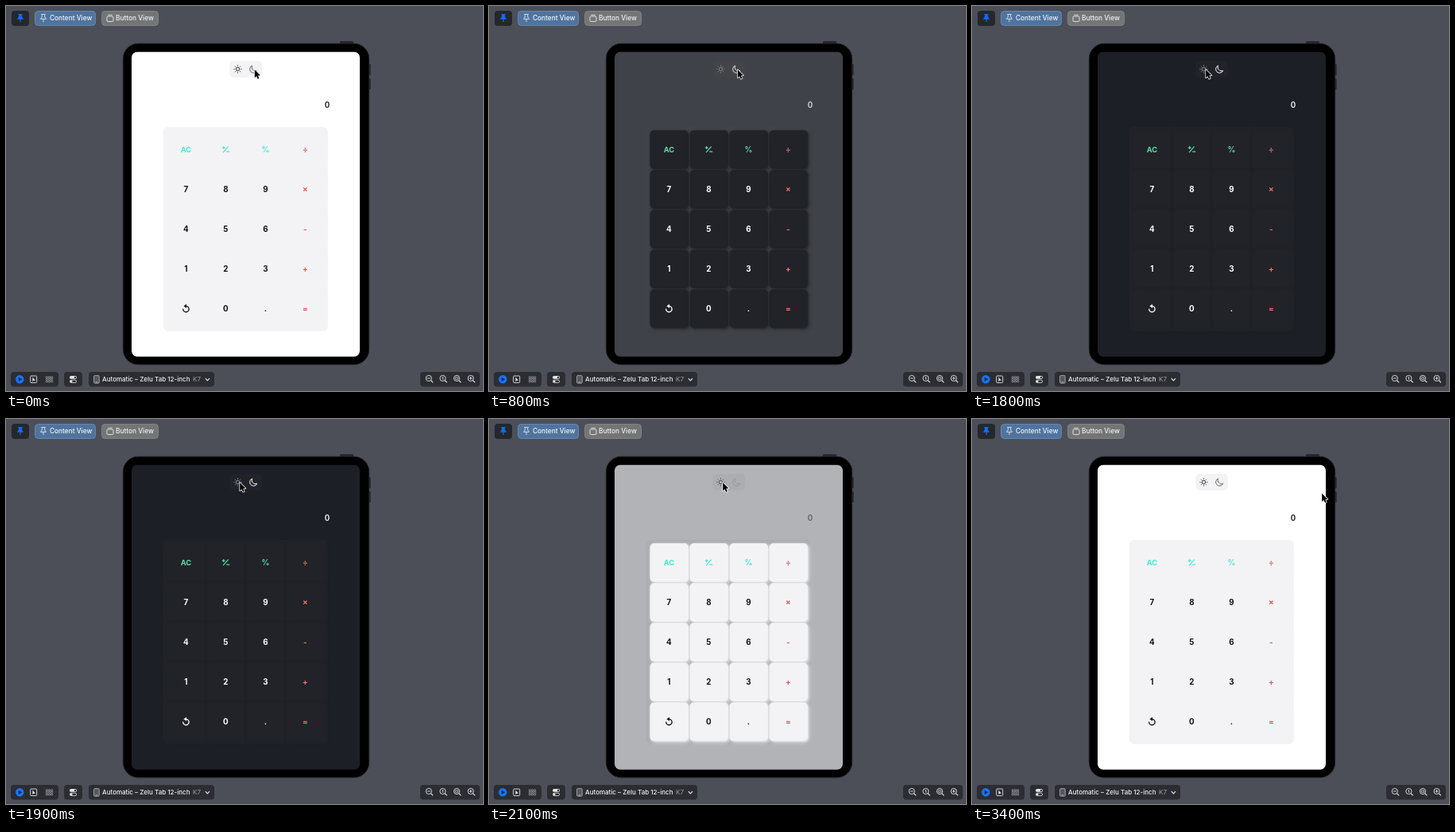
An HTML page with a canvas that plays this animation: 600 px wide and 484 px high, repeating every 3.5 s.

```html
<!DOCTYPE html>
<html lang="en">
<head>
<meta charset="utf-8">
<title>Calculator preview</title>
<style>
html, body { margin: 0; width: 100%; height: 100%; overflow: hidden; background: #4c4f58; }
canvas { display: block; }
</style>
</head>
<body>
<canvas id="stage" width="600" height="484"></canvas>
<script>
const ctx = document.getElementById('stage').getContext('2d');
const LOOP = 3500, STEP = 100;
const TO_DARK = 800, TO_LIGHT = 2000;
const FONT = 'Inter, "Open Sans", sans-serif';

// Each pair is [light, dark].
const THEME = {
  screen: [[255, 255, 255], [28, 31, 38]],
  panel: [[243, 243, 245], [33, 35, 40]],
  text: [[18, 18, 20], [255, 255, 255]],
  sun: [[18, 18, 20], [165, 166, 169]],
  moon: [[98, 98, 102], [255, 255, 255]],
  tool: [[62, 236, 208], [92, 222, 170]],
  operator: [[230, 82, 84], [242, 114, 108]]
};
const KEYS = [
  ['AC', '±', '%', '÷'],
  ['7', '8', '9', '×'],
  ['4', '5', '6', '-'],
  ['1', '2', '3', '+'],
  ['reset', '0', '.', '=']
];

const clamp = x => Math.max(0, Math.min(1, x));
const smooth = x => { x = clamp(x); return x * x * (3 - 2 * x); };
const mix = (a, b, p) => a + (b - a) * p;

function tone(name, darkness) {
  const [light, dark] = THEME[name];
  return `rgb(${light.map((v, i) => Math.round(mix(v, dark[i], darkness))).join(',')})`;
}

function box(x, y, w, h, r, fill, stroke, width = 1) {
  ctx.beginPath();
  ctx.roundRect(x, y, w, h, r);
  if (fill) { ctx.fillStyle = fill; ctx.fill(); }
  if (stroke) { ctx.strokeStyle = stroke; ctx.lineWidth = width; ctx.stroke(); }
}

function disc(x, y, r, fill) {
  ctx.beginPath();
  ctx.arc(x, y, r, 0, Math.PI * 2);
  ctx.fillStyle = fill;
  ctx.fill();
}

function ring(x, y, r, color, width) {
  ctx.beginPath();
  ctx.arc(x, y, r, 0, Math.PI * 2);
  ctx.strokeStyle = color;
  ctx.lineWidth = width;
  ctx.stroke();
}

function line(color, width, ...points) {
  ctx.beginPath();
  points.forEach(([x, y]) => ctx.lineTo(x, y));
  ctx.strokeStyle = color;
  ctx.lineWidth = width;
  ctx.stroke();
}

function polygon(fill, ...points) {
  ctx.beginPath();
  points.forEach(([x, y]) => ctx.lineTo(x, y));
  ctx.closePath();
  ctx.fillStyle = fill;
  ctx.fill();
}

function label(text, x, y, size, color, weight = 500, align = 'left') {
  ctx.font = `${weight} ${size}px ${FONT}`;
  ctx.textAlign = align;
  ctx.fillStyle = color;
  ctx.fillText(text, x, y);
}

function pin(x, y, color, filled) {
  ctx.beginPath();
  [[-2.5, -4.5], [2.5, -4.5], [1.6, -3.4], [1.8, -1], [3.5, 1.3], [-3.5, 1.3], [-1.8, -1], [-1.6, -3.4]]
    .forEach(([dx, dy]) => ctx.lineTo(x + dx, y + dy));
  ctx.closePath();
  ctx.strokeStyle = ctx.fillStyle = color;
  ctx.lineWidth = 0.8;
  if (filled) ctx.fill();
  ctx.stroke();
  line(color, filled ? 1.2 : 0.8, [x, y + 1.3], [x, y + 5]);
}

function drawTopBar() {
  box(7, 6, 22, 19, 4, '#25272c');
  pin(18, 15, '#0d6fff', true);
  box(36.5, 6.5, 76, 18, 4, '#4f749f', '#7190b3', 0.8);
  pin(47, 15, '#f0f4f8', false);
  label('Content View', 55, 18.3, 8.3, '#f4f6f9');
  box(120.5, 6.5, 71, 18, 4, '#747577', '#88898b', 0.8);
  box(127, 13, 8, 6.5, 1.3, null, '#eeeeee', 0.9);
  line('#eeeeee', 0.8, [128.3, 11.3], [133.7, 11.3]);
  label('Button View', 138, 18.3, 8.3, '#f2f2f2');
}

function magnifier(x, sign) {
  const c = '#e6e6e8', y = 468.5;
  ring(x - 0.7, y - 0.5, 3.6, c, 0.9);
  line(c, 1.2, [x + 2, y + 2.2], [x + 4.6, y + 4.8]);
  x -= 0.7;
  if (sign === '1') line(c, 0.9, [x - 0.8, y - 1.4], [x + 0.2, y - 2.1], [x + 0.2, y + 1.4]);
  else if (sign === 'fit') box(x - 1.6, y - 1.7, 3.2, 2.5, 0.4, null, c, 0.8);
  else {
    line(c, 0.9, [x - 1.9, y - 0.5], [x + 1.9, y - 0.5]);
    if (sign === '+') line(c, 0.9, [x, y - 2.4], [x, y + 1.4]);
  }
}

function drawBottomBar() {
  const ink = '#e6e6e8';
  [[6, 60], [73, 23], [104, 158], [521, 75]].forEach(([x, w]) => box(x, 460, w, 18.5, 4, '#2b2d32'));

  disc(17.3, 469.3, 5.2, '#1674ff');
  polygon('#25272c', [15.8, 466.7], [15.8, 471.9], [20.2, 469.3]);

  box(30.7, 465, 8, 8.6, 1.2, null, ink, 0.9);
  polygon(ink, [33.4, 466.8], [33.4, 472], [34.7, 470.9], [36.9, 470.5]);

  for (let i = 0; i < 9; i++)
    box(50.2 + i % 3 * 3.2, 465.8 + Math.floor(i / 3) * 2.7, 2.2, 1.8, 0.4, null, '#b9babd', 0.6);

  box(80, 465, 9, 3.8, 1.9, ink);
  disc(87, 466.9, 1.2, '#2b2d32');
  box(80.4, 470.2, 8.2, 3.4, 1.7, null, ink, 0.8);
  disc(82.2, 471.9, 1.3, ink);

  box(110.6, 464.6, 6.6, 9.6, 1.1, '#55575c', '#b7b8bb', 0.8);
  line('#dcdcde', 0.7, [112.7, 472.8], [115.1, 472.8]);
  label('Automatic – Zelu Tab 12-inch', 121, 472.4, 8, '#f0f0f2');
  label('K7', 235, 472.4, 8, '#a2a3a7', 400);
  line(ink, 1.2, [250.8, 468.2], [253.4, 470.8], [256, 468.2]);

  ['-', '1', 'fit', '+'].forEach((sign, i) => magnifier(532.5 + i * 17.6, sign));
}

function drawTablet() {
  box(420, 44.3, 17, 4, 1.3, '#24262b');
  box(455, 73, 3.6, 14, 1.2, '#24262b');
  box(455, 91, 3.6, 14, 1.2, '#24262b');
  box(147.3, 47.2, 309.4, 403.6, 19, '#000', '#1f2126', 1);
}

function drawSun(color) {
  const x = 291.5, y = 79.4;
  ring(x, y, 2.2, color, 0.9);
  for (let i = 0; i < 8; i++) {
    const a = i * Math.PI / 4, c = Math.cos(a), s = Math.sin(a);
    line(color, 1, [x + 3.9 * c, y + 3.9 * s], [x + 5 * c, y + 5 * s]);
  }
}

function drawMoon(color) {
  const x = 311.4, y = 79.4;
  ctx.beginPath();
  ctx.arc(x, y, 4.7, -1.95, 0.38, true);
  ctx.bezierCurveTo(x + 0.5, y + 3.4, x - 3.6, y - 0.2, x - 1.74, y - 4.37);
  ctx.closePath();
  ctx.strokeStyle = color;
  ctx.lineWidth = 1;
  ctx.stroke();
}

function drawReset(x, y, color) {
  ctx.beginPath();
  ctx.arc(x, y + 0.6, 3.7, -Math.PI / 2, Math.PI * 1.03);
  ctx.strokeStyle = color;
  ctx.lineWidth = 1.35;
  ctx.stroke();
  polygon(color, [x + 0.6, y - 5.7], [x + 0.6, y - 0.6], [x - 3, y - 3.1]);
}

function drawPlusMinus(x, y, color) {
  line(color, 1.2, [x - 4.6, y - 2.2], [x - 0.8, y - 2.2]);
  line(color, 1.2, [x - 2.7, y - 4.1], [x - 2.7, y - 0.3]);
  line(color, 1.2, [x - 3.3, y + 3.8], [x + 3.2, y - 3.8]);
  line(color, 1.2, [x + 0.8, y + 2.7], [x + 4.8, y + 2.7]);
}

function drawKeys(dark) {
  const fill = tone('panel', dark);
  ctx.save();
  ctx.shadowColor = fill;
  ctx.shadowBlur = 4;
  ctx.shadowOffsetX = ctx.shadowOffsetY = 1.5;
  KEYS.forEach((row, r) => row.forEach((_, c) =>
    box(202.5 + c * 50, 156.2 + r * 50, 48.4, 48.6, 5, fill)));
  ctx.restore();

  KEYS.forEach((row, r) => row.forEach((key, c) => {
    const x = 226.4 + c * 50, y = 180.4 + r * 50;
    const color = tone(c === 3 ? 'operator' : r === 0 ? 'tool' : 'text', dark);
    if (key === 'reset') drawReset(x, y, color);
    else if (key === '±') drawPlusMinus(x, y, color);
    else label(key, x, y + 3.5, key === 'AC' ? 9.3 : 9.8, color, 700, 'center');
  }));
}

function drawScreen(t) {
  const dark = t >= TO_DARK && t < TO_LIGHT ? 1 : 0;
  let fade = 0;
  if (dark) fade = smooth((t - TO_DARK) / 385 + 0.75);
  else if (t >= TO_LIGHT) fade = 1 - smooth((t - TO_LIGHT) / 385 + 0.35);

  box(158, 57.8, 287, 383, 7, tone('screen', fade));
  box(281.3, 69, 40.6, 20.8, 5, tone('panel', fade));
  drawSun(tone('sun', fade));
  drawMoon(tone('moon', fade));
  label('0', 404, 127.7, 9.8, tone('text', fade), 600, 'center');
  box(197.8, 152, 207, 256.7, 6, tone('panel', fade));
  drawKeys(dark);
}

function drawPointer(t) {
  const across = smooth((t - 1300) / 400), away = smooth((t - 3100) / 300);
  const x = mix(mix(312.8, 294.2, across), 440.2, away);
  const y = mix(80, 93.6, away);
  ctx.beginPath();
  [[0, 0], [0, 10.3], [2.3, 8.2], [3.9, 11.7], [5.6, 11], [4.1, 7.5], [7.2, 7.3]]
    .forEach(([dx, dy]) => ctx.lineTo(x + dx, y + dy));
  ctx.closePath();
  ctx.lineJoin = 'round';
  ctx.strokeStyle = '#fff';
  ctx.lineWidth = 1.5;
  ctx.stroke();
  ctx.fillStyle = '#000';
  ctx.fill();
  ctx.lineJoin = 'miter';
}

function draw(t) {
  ctx.fillStyle = '#4c4f58';
  ctx.fillRect(0, 0, 600, 484);
  drawTopBar();
  drawTablet();
  drawScreen(t);
  drawBottomBar();
  drawPointer(t);
}

let start;
function tick(now) {
  start ??= now;
  draw(Math.floor((now - start) % LOOP / STEP) * STEP);
  requestAnimationFrame(tick);
}
draw(0);
requestAnimationFrame(tick);
</script>
</body>
</html>
```
